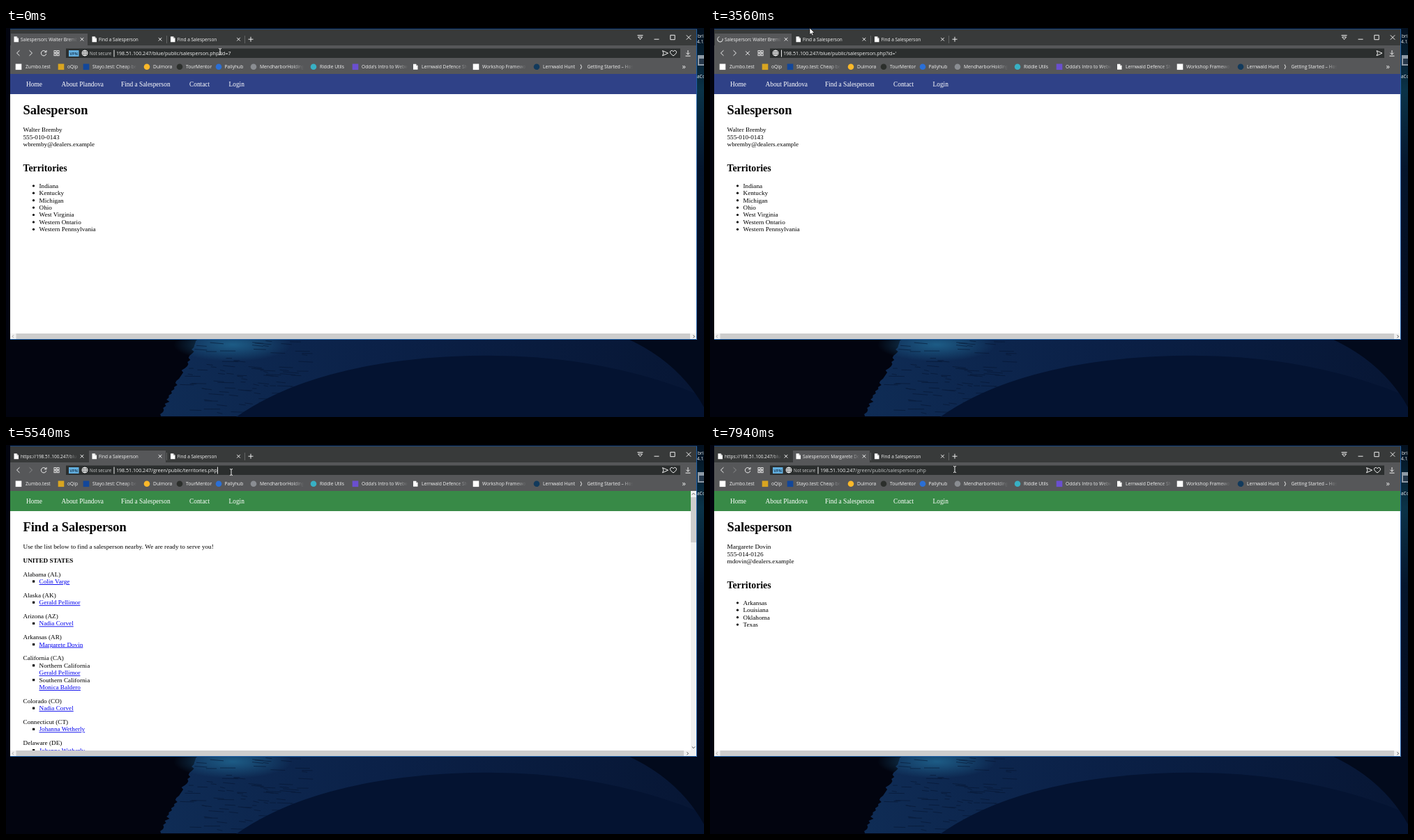
Animation, 1001 px wide and 559 px high, one loop 8000 ms. Source, as an HTML page:

```html
<!DOCTYPE html>
<html lang="en">
<head>
<meta charset="utf-8">
<title>Browser session</title>
<style>
html, body { margin: 0; width: 100%; height: 100%; overflow: hidden; background: #02040f; }
svg { display: block; width: 1001px; height: 559px; }
text { white-space: pre; }
.ui { font-family: "Open Sans", "Noto Sans", sans-serif; fill: #f4f4f4; }
.page { font-family: "Liberation Serif", "Times New Roman", serif; fill: #000; }
.line { fill: none; stroke: #eee; stroke-width: 1; }
.link { fill: #0000ee; text-decoration: underline; }
</style>
</head>
<body>
<svg id="stage" viewBox="0 0 1001 559"></svg>
<script>
const LOOP = 8000;
const HOST = "198.51.100.247";
const BLUE = "/blue/public/salesperson.php?id=";
const LIST = "/green/public/territories.php";
const DETAIL = "/green/public/salesperson.php";

const defs = [];
const text = (x, y, s, size = 9.2, attr = "") => `<text x="${x}" y="${y}" font-size="${size}" ${attr}>${s}</text>`;
const rect = (x, y, w, h, fill, attr = "") => `<rect x="${x}" y="${y}" width="${w}" height="${h}" fill="${fill}" ${attr}/>`;
const disc = (x, y, r, fill) => `<circle cx="${x}" cy="${y}" r="${r}" fill="${fill}"/>`;
const line = (d, attr = "") => `<path class="line" d="${d}" ${attr}/>`;
const group = (id, body, attr = "") => `<g id="${id}" ${attr}>${body}</g>`;

// Paint that turns transparent between x1 and x2
function fade(x1, x2) {
  const id = "fade" + defs.length;
  defs.push(`<linearGradient id="${id}" gradientUnits="userSpaceOnUse" x1="${x1}" x2="${x2}" y1="0" y2="0">
    <stop stop-color="#f2f2f2"/><stop offset="1" stop-color="#f2f2f2" stop-opacity="0"/></linearGradient>`);
  return `style="fill:url(#${id})"`;
}

function seeded(seed) {
  return () => (seed = (seed * 16807) % 2147483647) / 2147483647;
}

function wallpaper() {
  const rnd = seeded(77);
  let edge = "M276 446";
  for (let y = 450; y <= 560; y += 3) edge += `L${(276 - (y - 448) * 0.5 + rnd() * 6 - 3).toFixed(1)} ${y}`;
  let streaks = "";
  for (let i = 0; i < 90; i++) {
    const y = 449 + rnd() * 105, x = 275 - (y - 448) * 0.45 + rnd() * 170;
    streaks += `M${x.toFixed(1)} ${y.toFixed(1)}l${(6 + rnd() * 18).toFixed(1)} ${(rnd() * 2).toFixed(1)}`;
  }
  defs.push(`<linearGradient id="sea" x1="0" x2="1" y1="0" y2="0"><stop stop-color="#0f2c55"/>
    <stop offset=".4" stop-color="#0b2148"/><stop offset="1" stop-color="#071634"/></linearGradient>
    <radialGradient id="glow"><stop stop-color="#1d5c86"/><stop offset="1" stop-color="#1d5c86" stop-opacity="0"/></radialGradient>
    <linearGradient id="side" x1="0" x2="0" y1="0" y2="1"><stop stop-color="#03101f"/>
    <stop offset=".2" stop-color="#0a3348"/><stop offset=".45" stop-color="#04152c"/><stop offset="1" stop-color="#030a1c"/></linearGradient>`);
  return rect(0, 0, 1001, 559, "#02040f")
    + `<path d="${edge}H1001V446Z" fill="url(#sea)"/>`
    + `<ellipse cx="325" cy="455" rx="85" ry="24" fill="url(#glow)"/>`
    + `<path d="${streaks}" stroke="#061530" stroke-width="1" opacity=".6"/>`
    + `<path d="M330 559Q440 482 640 472T1001 530V559Z" fill="#041331"/>`
    + `<path d="M890 446Q965 480 1001 545V446Z" fill="#020a1c"/>`
    + rect(991, 0, 10, 448, "url(#side)")
    + rect(992, 39, 9, 15, "#8e9aa6") + rect(994, 44, 7, 8, "#26384a")
    + `<g class="ui">${text(992, 14, "bri", 6.5)}${text(991, 22, "4.1.", 6.5)}${text(991, 72, "aCo", 6.5)}</g>`;
}

const docIcon = (x, y) => `<path d="M${x - 3} ${y - 4}h4l2.5 2.5V${y + 4}h-6.5z" fill="#fff"/><path d="M${x + 1} ${y - 4}v2.5h2.5z" fill="#999"/>`;
const cross = (x, y, r) => `M${x - r} ${y - r}l${2 * r} ${2 * r}m0 ${-2 * r}l${-2 * r} ${2 * r}`;
const globe = (x) => line(`M${x - 4} 36a4 4 0 1 0 8 0a4 4 0 1 0-8 0hm0 0h8M${x} 32v8M${x} 32q-4 4 0 8q4-4 0-8`.replace("hm", "m"), 'stroke-width=".7"');
const send = (id, x) => group(id, line(`M${x - 4} 32.6l8 3.6l-8 3.6l1.5-3.6z`, 'stroke-width=".8"'));

function bookmarks() {
  const marks = [
    [18, "square", "#fff", 28, "Zumbo.test"], [79, "square", "#d9a520", 88, "oQip"],
    [115, "square", "#12479a", 124, "Stayo.test: Cheap beds", 187], [202, "disc", "#fbb829", 211, "Dulmora"],
    [249, "disc", "#2c2f2c", 258, "TourMentor"], [305, "disc", "#2b6fd6", 313.5, "Pallyhub"],
    [355, "disc", "#8a8d92", 364, "MendharborHoldings -", 427], [441, "disc", "#38b0c4", 450, "Riddle Utils"],
    [501, "square", "#6a4fd0", 510, "Odda's Intro to Webwork", 576], [587, "doc", "", 596, "Lernwald Defence Sheet", 662],
    [674, "square", "#fff", 683, "Workshop Framework", 746], [761, "disc", "#123a5c", 770, "Lernwald Hunt"],
    [825, "bar", "", 833.5, "Getting Started – Host", 899]
  ];
  return marks.map(([ix, kind, color, tx, label, end]) => {
    const icon = kind === "square" ? rect(ix - 4.3, 51.5, 8.6, 8.6, color)
      : kind === "disc" ? disc(ix, 55.8, 4.3, color)
      : kind === "doc" ? docIcon(ix, 55.8) : line(`M${ix - 1} 52.5q3 3.3 0 6.6`);
    return icon + text(tx, 58.2, label, 6.7, end ? fade(end - 16, end) : "");
  }).join("") + text(969.5, 59, "»", 11);
}

function chrome() {
  const tab = (i, x) => group("icon" + i, docIcon(x, 16.2))
    + text(x + 6.5, 19, "Find a Salesperson", 6.5, `id="title${i}" ${fade(x + 74, x + 88)}`)
    + line(cross(x + 94.5, 16.2, 2.3), 'stroke-width=".9"');
  return rect(6, 2, 985, 446, "#383a3a") + rect(6, 25, 985, 41, "#565759")
    + line("M6 1.5H991", 'style="stroke:#17457c"')
    + rect(7, 8, 110, 18, "#565759", 'id="active"')
    + line("M230.5 11v11M342.5 11v11", 'style="stroke:#626464"')
    + tab(0, 14.5) + tab(1, 126.5) + tab(2, 239)
    + `<path id="spinner" class="line" d="M0-3.7A3.7 3.7 0 1 0 3.7 0" stroke-width=".9"/>`
    + line("M347.5 16.2h7M351 12.7v7")
    + line("M905.5 10.5h8M906.5 12.8h6l-3 3.8z", 'stroke-width=".9"')
    + line("M929.5 16.2h7M952.8 10.3h6.4v6.4h-6.4zM975.8 10.3l6.4 6.4m0-6.4l-6.4 6.4")
    + line("M19.5 32.2l-4 3.8l4 3.8") + line("M33.5 32.2l4 3.8l-4 3.8", 'id="forward"')
    + group("reload", line("M57.3 34.4A3.7 3.7 0 1 0 57.7 37M58 32v2.8h-2.8"))
    + group("stop", line(cross(54, 36.2, 2.8)))
    + `<g fill="none" stroke="#eee" stroke-width=".9">${[0, 4.2].map(a => [0, 4.2].map(b => rect(69 + a, 32.6 + b, 2.9, 2.9, "none")).join("")).join("")}</g>`
    + rect(86, 29.5, 881, 13.5, "#2b2e2e")
    + group("badge", rect(90, 32, 14.5, 9, "#62aede") + text(91.6, 38.8, "VPN", 5.6, 'style="fill:#17334d" font-weight="600"')
      + globe(113) + text(120, 38.6, "Not secure", 6.2, 'style="fill:#d0d0d0"') + line("M155 31.5v10", 'stroke-width=".8"')
      + send("sendA", 945.5)
      + line("M957 40q-7-4.8-3.3-7.4q2-1 3.3 1.2q1.300-2.200 3.300-1.200q3.700 2.600-3.300 7.400z", 'stroke-width=".9"'))
    + group("plain", globe(94) + line("M102.500 31.500v10", 'stroke-width=".8"') + send("sendB", 960))
    + rect(158, 31, 0, 11, "#2f7bd9", 'id="select"')
    + `<text id="url" y="39" font-size="7.100"><tspan id="host">${HOST}</tspan><tspan id="path"></tspan></text>`
    + line("M0 31.500v10", 'id="caret" stroke-width=".900"')
    + line("M978 32v6M975.500 35.700l2.500 2.500l2.500-2.500M974.500 40.200h7")
    + bookmarks();
}

function bars(right) {
  const vertical = right < 980
    ? rect(982, 66, 8.5, 373, "#f0f0f0") + rect(982, 75, 8.5, 65, "#cdcdcd")
      + line("M983.8 71.500l2.200-2.200l2.200 2.200M983.800 433.500l2.200 2.200l2.200-2.200", 'style="stroke:#505050"') : "";
  return vertical + rect(6, 439, 984.5, 8.5, "#f0f0f0") + rect(14.5, 439, right - 14.5, 8, "#cdcdcd")
    + line("M11 441.300l-2 2l2 2", 'style="stroke:#a5a5a5"') + line(`M${right + 4.500} 441.300l2 2l-2 2`, 'style="stroke:#505050"');
}

function page(id, color, body, right = 981) {
  const nav = [[29, "Home"], [79.5, "About Plandova"], [165, "Find a Salesperson"], [263, "Contact"], [319.5, "Login"]];
  const head = color ? rect(6, 66, 985, 29, color) + nav.map(([x, s]) => text(x, 84, s, 9.35, 'fill="#fff"')).join("") : "";
  return group(id, rect(6, 66, 985, 382, "#fff") + head + body + bars(right));
}

const heading = s => text(24.5, 124, s, 18.4, 'font-weight="bold"');

function person(lines, places) {
  return heading("Salesperson")
    + lines.map((s, i) => text(24.5, 149.3 + i * 10.4, s)).join("")
    + text(24.5, 206.4, "Territories", 13.8, 'font-weight="bold"')
    + places.map((s, i) => disc(39.5, 226.8 + i * 10.42, 1.6, "#000") + text(47.5, 229.7 + i * 10.42, s)).join("");
}

function directory() {
  const rows = [
    ["Alabama (AL)", "Colin Varge"], ["Alaska (AK)", "Gerald Pellimor"], ["Arizona (AZ)", "Nadia Corvel"],
    ["Arkansas (AR)", "Margarete Dovin"],
    ["California (CA)", "-Northern California", "Gerald Pellimor", "-Southern California", "Monica Baldero"],
    ["Colorado (CO)", "Nadia Corvel"], ["Connecticut (CT)", "Johanna Wetherly"], ["Delaware (DE)", "Johanna Wetherly"]
  ];
  let y = 188.6;
  let out = heading("Find a Salesperson")
    + text(24.5, 149.3, "Use the list below to find a salesperson nearby. We are ready to serve you!")
    + text(24.5, 168.8, "UNITED STATES", 9.2, 'font-weight="bold"');
  for (const [state, ...items] of rows) {
    out += text(24.5, y, state);
    items.forEach((s, i) => {
      y += 10.4;
      const region = s[0] === "-";
      if (region || !i) out += rect(38, y - 4.6, 3.2, 3.2, "#000");
      out += text(47.5, y, region ? s.slice(1) : s, 9.2, region ? "" : 'class="link"');
    });
    y += 19.8;
  }
  return out;
}

const pages = page("blue", "#2f4187", person(
    ["Walter Bremby", "555-010-0143", "wbremby@dealers.example"],
    ["Indiana", "Kentucky", "Michigan", "Ohio", "West Virginia", "Western Ontario", "Western Pennsylvania"]))
  + page("blank", "", "")
  + page("list", "#388a47", directory(), 972)
  + page("detail", "#388a47", person(
    ["Margarete Dovin", "555-014-0126", "mdovin@dealers.example"],
    ["Arkansas", "Louisiana", "Oklahoma", "Texas"]));

const bubble = group("status", rect(6, 432, 199.5, 15.5, "#f4f4f4", 'stroke="#ccc" stroke-width=".6"')
  + text(12, 442.6, `https://${HOST}${DETAIL}?id=5`, 6.8, 'style="fill:#777"'), 'class="ui"');

const cursors = group("beam", line("M-2-4.5q2 0 2 1.200q0-1.200 2-1.200M0-3.500v7M-2 4.500q2 0 2-1.200q0 1.200 2 1.200", 'stroke-width=".9"'))
  + group("arrow", `<path d="M0 0V9.600L2.200 7.500L3.700 11L5.300 10.300L3.800 6.900H6.900Z" fill="#fff" stroke="#000" stroke-width=".6"/>`)
  + group("hand", `<path d="M-2.200-5.500q1.200-1.200 2 0V-1.500q1.200-.8 1.800.3q1.200-.6 1.700.5q1.400-.2 1.400 1.200V3.500L3.600 7.500H-1.500L-4.400 2.800q-.4-1.800 1.200-1.300l1 1z" fill="#fff" stroke="#000" stroke-width=".7"/>`);

const art = wallpaper() + `<g class="ui">${chrome()}</g><g class="page">${pages}</g>` + bubble
  + line("M990.500 2V447.500H6", 'style="stroke:#1c5fa8"') + group("cursor", cursors);
const stage = document.getElementById("stage");
stage.innerHTML = `<defs>${defs.join("")}</defs>${art}`;

const el = id => document.getElementById(id);
const show = (id, on) => { el(id).style.display = on ? "" : "none"; };

const states = [
  [0, { page: "blue", tab: 0, titles: ["Salesperson: Walter Bremby", "Find a Salesperson"], spin: -1, path: BLUE + "7",
        typing: false, focus: true, caret: false, select: false, status: 0 }],
  [130, { select: true }],
  [270, { select: false }],
  [420, { caret: true }],
  [850, { caret: false }],
  [1000, { caret: true }],
  [1570, { path: BLUE, typing: true }],
  [1860, { path: BLUE + "'" }],
  [2150, { caret: false, spin: 0 }],
  [3690, { page: "blank", spin: -1, titles: [`https://${HOST}/blue/public`, "Find a Salesperson"] }],
  [3950, { page: "list", tab: 1, path: LIST, typing: false, focus: false }],
  [5130, { focus: true, select: true }],
  [5410, { select: false }],
  [5540, { caret: true }],
  [6780, { status: 0.25 }],
  [6920, { status: 0.5 }],
  [7070, { status: 1, spin: 1 }],
  [7330, { page: "detail", path: DETAIL, focus: false, caret: false, status: 0, spin: -1,
           titles: [`https://${HOST}/blue/public`, "Salesperson: Margarete Dovin"] }]
];

// Pointer stops: a start time, a step length, a shape and points
const moves = [
  [0, 138, "beam", [307, 34], [316, 36], [325, 37], [333, 37]],
  [1000, 140, "beam", [334, 37.5]],
  [2300, 143, "arrow", [318, 50], [300, 58], [280, 62], [265, 58], [235, 40], [200, 22], [170, 8], [152, 2], [145, 0]],
  [3560, 130, "arrow", [143, 0], [150, 9], [158, 13], [164, 15.5], [166, 16], [172, 20], [205, 27]],
  [4540, 145, "beam", [270, 36], [312, 38], [323, 39]],
  [6080, 140, "arrow", [318, 46], [290, 75], [240, 130], [180, 195], [130, 250], [100, 280]],
  [6920, 140, "hand", [88.5, 290]],
  [7330, 133, "arrow", [95, 280], [150, 200], [240, 110], [320, 52]],
  [7830, 110, "beam", [346, 38], [351, 35]]
];

const lastBefore = (list, t) => list.filter(item => item[0] <= t).pop();

function draw(t) {
  const s = Object.assign({}, ...states.filter(([at]) => at <= t).map(([, change]) => change));
  for (const id of ["blue", "blank", "list", "detail"]) show(id, id === s.page);

  el("active").setAttribute("x", s.tab ? 119 : 7);
  s.titles.forEach((title, i) => {
    el("title" + i).textContent = title;
    show("icon" + i, s.spin !== i);
  });
  const loading = s.spin >= 0;
  show("spinner", loading);
  show("stop", loading);
  show("reload", !loading);
  el("spinner").setAttribute("transform", `translate(${s.spin > 0 ? 126.5 : 14.5} 16.2) rotate(${t * 0.4 % 360})`);
  el("forward").style.opacity = s.tab ? 0.35 : 1;

  const x = s.typing ? 105 : 158;
  show("badge", !s.typing);
  show("plain", s.typing);
  el("url").setAttribute("x", x);
  el("path").textContent = s.path;
  el("path").style.fill = s.focus ? "" : "#c2c4c4";
  const width = el("url").getComputedTextLength();
  el("select").setAttribute("width", s.select ? width : 0);
  show("caret", s.caret);
  el("caret").setAttribute("transform", `translate(${x + width + 0.5} 0)`);
  el("status").style.opacity = s.status;

  const [start, step, shape, ...points] = lastBefore(moves, t);
  const [px, py] = points[Math.min(points.length - 1, Math.floor((t - start) / step + 0.01))];
  for (const id of ["beam", "arrow", "hand"]) show(id, id === shape);
  el("cursor").setAttribute("transform", `translate(${px} ${py})`);
}

const begin = performance.now();
function tick() {
  draw((performance.now() - begin) % LOOP);
  requestAnimationFrame(tick);
}
tick();
</script>
</body>
</html>
```
